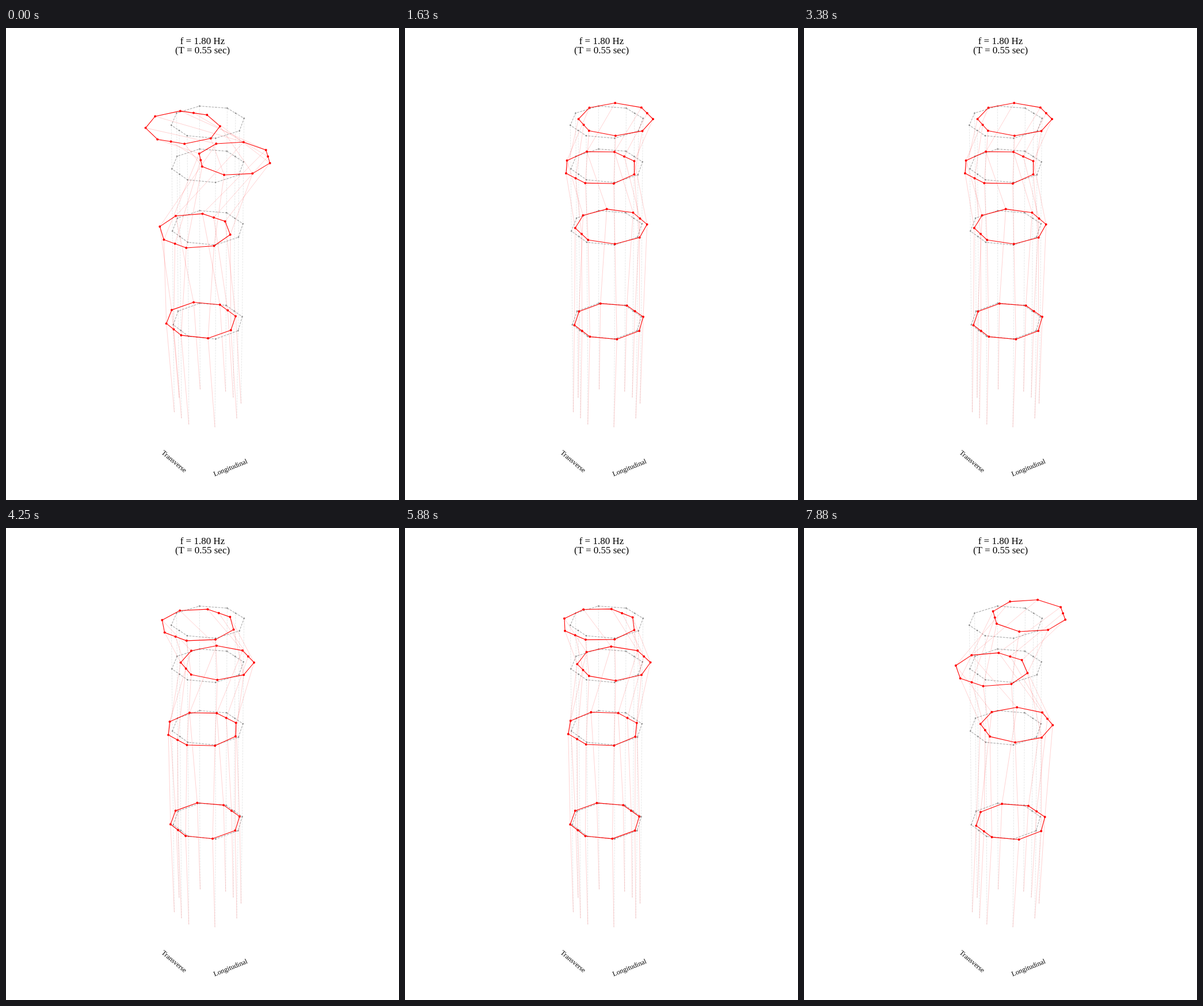
Write an HTML page that moves like this. It is 683 px wide and 820 px high and loops after 8 s.

```html
<!DOCTYPE html>
<html lang="en">
<head>
<meta charset="utf-8">
<title>Mode shape</title>
<style>
  html, body { margin: 0; width: 100%; height: 100%; overflow: hidden; background: #fff; }
  svg { display: block; width: 683px; height: 820px; }
  path { fill: none; stroke-linejoin: round; }
  text { font-family: "Liberation Serif", "Times New Roman", serif; font-size: 17px; text-anchor: middle; fill: #000; }
  .axis { font-size: 12.1px; }
  .rest { stroke: #808080; }
  .live { stroke: #f00; }
  .post { stroke-width: .7; }
  .rest.post { stroke-opacity: .28; stroke-dasharray: 3.2 1.5; }
  .live.post { stroke-opacity: .26; }
  .ring { stroke-width: 1.1; }
  .rest.ring { stroke-opacity: .65; stroke-dasharray: 3.8 1.7; }
  .dots { stroke-linecap: round; }
  .rest.dots { stroke-width: 2.7; stroke-opacity: .8; }
  .live.dots { stroke-width: 4; }
</style>
</head>
<body>
<svg viewBox="0 0 683 820">
  <path class="rest post"/><path class="rest ring"/><path class="rest dots"/>
  <path class="live post"/><path class="live ring"/><path class="live dots"/>
  <text x="341.5" y="28">f = 1.80 Hz</text>
  <text x="341.5" y="44.3">(T = 0.55 sec)</text>
  <text class="axis" transform="translate(292 753) rotate(40)" dy=".3em">Transverse</text>
  <text class="axis" transform="translate(390 764) rotate(-22)" dy=".3em">Longitudinal</text>
</svg>
<script>
// Levels from ground to top: centre, half axes u and v on screen,
// shift of the pivot (end of u) and tangent of the twist at full swing.
const levels = [
  { c: [350, 660],     u: [45, -18],     v: [31.4, 25.4], shift: [0, 0],        twist: 0 },
  { c: [350.2, 508.6], u: [46.2, -17],   v: [33, 24],     shift: [-11.1, -1],   twist: -0.022 },
  { c: [350, 346.5],   u: [47.5, -16],   v: [33.3, 23.2], shift: [-36.5, -1.3], twist: 0.354 },
  { c: [350, 238.7],   u: [48.2, -15.5], v: [33.8, 22.6], shift: [57, 0],       twist: -0.53 },
  { c: [350, 163],     u: [49, -15],     v: [34.3, 21.7], shift: [-73, -0.4],   twist: 0.72 }
];

// Regular octagon with the midpoints of two opposite sides.
const k = Math.SQRT2 - 1;
const plan = [[1, -k], [1, 0], [1, k], [k, 1], [-k, 1],
              [-1, k], [-1, 0], [-1, -k], [-k, -1], [k, -1]];

function levelPoints({ c, u, v, shift, twist }, swing) {
  const angle = Math.atan(twist * swing);
  const cos = Math.cos(angle), sin = Math.sin(angle);
  const offset = ([a, b]) => {
    const p = a * cos + b * sin, q = b * cos - a * sin;
    const depth = 1 - 0.02 * q;
    return [0, 1].map(i => (p * u[i] + q * v[i]) / depth);
  };
  const arm = offset([1, 0]);
  const mid = [0, 1].map(i => c[i] + u[i] + shift[i] * swing - arm[i]);
  return plan.map(pt => offset(pt).map((d, i) => (mid[i] + d).toFixed(2)));
}

const line = pts => "M" + pts.map(p => p.join(" ")).join("L");

function draw(kind, swing) {
  const tower = levels.map(level => levelPoints(level, swing));
  const floors = tower.slice(1);
  const put = (part, d) => document.querySelector(`.${kind}.${part}`).setAttribute("d", d);
  put("post", plan.map((_, i) => line(tower.map(pts => pts[i]))).join(""));
  put("ring", floors.map(pts => line(pts) + "Z").join(""));
  put("dots", floors.flat().map(p => `M${p.join(" ")}h0`).join(""));
}

const LOOP = 8000, STEP = 125, CYCLE = 40;

// Steps start on whole hundredths of a second.
function stepAt(t) {
  const n = Math.floor(t / STEP);
  return t < 10 * Math.round(n * STEP / 10) ? n - 1 : n;
}

// Triangle wave from 1 to -1 and back.
const swingAt = n => Math.abs(n % CYCLE - CYCLE / 2) / (CYCLE / 4) - 1;

let start, shown = -1;
function tick() {
  const now = performance.now();
  start ??= now;
  const n = stepAt((now - start) % LOOP);
  if (n !== shown) draw("live", swingAt(shown = n));
  requestAnimationFrame(tick);
}

draw("rest", 0);
tick();
</script>
</body>
</html>
```
